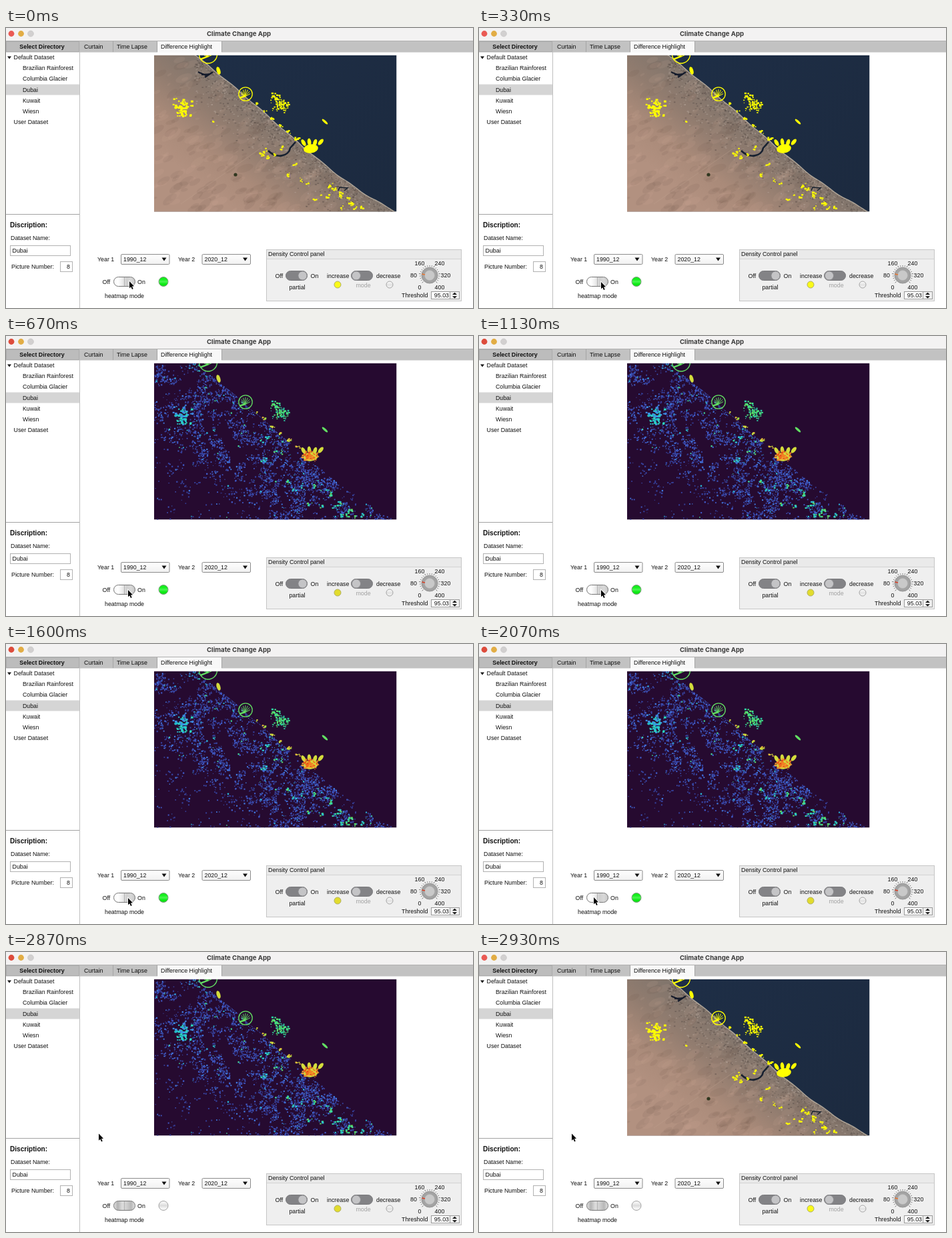
Write an HTML page with a canvas that moves like this. It is 700 by 420 pixels and loops after 2990 ms.

```html
<!DOCTYPE html>
<html lang="en">
<head>
<meta charset="utf-8">
<title>Climate Change App</title>
<style>
html, body { margin: 0; width: 100%; height: 100%; overflow: hidden; background: #fff; }
canvas { display: block; }
</style>
</head>
<body>
<canvas id="stage" width="700" height="420"></canvas>
<script>
const LOOP = 2990, HEAT_START = 400, HEAT_END = 2930, SWITCH_OFF = 2200;
const MAP = { x: 222, y: 41, w: 363.5, h: 234.5 };
const TAU = Math.PI * 2;
const stage = document.getElementById('stage').getContext('2d');

function seeded(seed) {
  return () => {
    seed = (seed + 0x6D2B79F5) | 0;
    let t = Math.imul(seed ^ (seed >>> 15), 1 | seed);
    t = (t + Math.imul(t ^ (t >>> 7), 61 | t)) ^ t;
    return ((t ^ (t >>> 14)) >>> 0) / 4294967296;
  };
}

function layer(paint) {
  const c = document.createElement('canvas');
  c.width = 700;
  c.height = 420;
  paint(c.getContext('2d'));
  return c;
}

function rect(g, x, y, w, h, fill, stroke) {
  if (fill) { g.fillStyle = fill; g.fillRect(x, y, w, h); }
  if (stroke) { g.strokeStyle = stroke; g.lineWidth = 1; g.strokeRect(x + .5, y + .5, w - 1, h - 1); }
}

function line(g, points, color, width = 1) {
  g.beginPath();
  points.forEach(([x, y]) => g.lineTo(x, y));
  g.strokeStyle = color;
  g.lineWidth = width;
  g.stroke();
}

function oval(g, x, y, rx, ry, fill, stroke, width = 1, turn = 0) {
  g.beginPath();
  g.ellipse(x, y, rx, ry, turn, 0, TAU);
  if (fill) { g.fillStyle = fill; g.fill(); }
  if (stroke) { g.strokeStyle = stroke; g.lineWidth = width; g.stroke(); }
}

const disc = (g, x, y, r, fill, stroke, width) => oval(g, x, y, r, r, fill, stroke, width);

// A triangle w wide; positive h points down, negative h points up.
function triangle(g, x, y, w, h) {
  g.beginPath();
  g.moveTo(x - w / 2, y);
  g.lineTo(x + w / 2, y);
  g.lineTo(x, y + h);
  g.fillStyle = '#111';
  g.fill();
}

function text(g, str, x, y, { size = 8.85, bold = false, color = '#111', align = 'left',
  family = '"Liberation Sans", Arial, sans-serif' } = {}) {
  g.font = `${bold ? 'bold ' : ''}${size}px ${family}`;
  g.fillStyle = color;
  g.textAlign = align;
  g.fillText(str, x, y);
}

// Colours spread evenly from one point to the other.
function gradient(g, x0, y0, x1, y1, ...colors) {
  const grad = g.createLinearGradient(x0, y0, x1, y1);
  colors.forEach((color, i) => grad.addColorStop(i / (colors.length - 1), color));
  return grad;
}

// Map

function coastY(x) {
  const u = (x - 284) / 301;
  const bulge = u > 0 && u < 1 ? 13 * Math.sin(Math.PI * u ** 1.8) : 0;
  return 41 + 235 * u + bulge + Math.sin(x / 7) * .8;
}

function coastline(from, to) {
  const points = [];
  for (let x = from; x <= to; x += 3) points.push([x, coastY(x)]);
  return points;
}

function clipMap(g) {
  g.beginPath();
  g.rect(MAP.x, MAP.y, MAP.w, MAP.h);
  g.clip();
}

function scatter(g, rnd, x, y, rx, ry, count, size, colors) {
  const spread = r => (rnd() + rnd() - 1) * r * 1.25;
  for (let i = 0; i < count; i++) {
    const s = size * (.6 + rnd() * .8);
    rect(g, x + spread(rx) - s / 2, y + spread(ry) - s / 2, s, s * .8, colors[Math.floor(rnd() * colors.length)]);
  }
}

function palmIsland(g, x, y, r, color) {
  disc(g, x, y, r, null, color, 1.3);
  for (let i = -3; i <= 3; i++) {
    const a = -Math.PI / 2 + i * .5;
    line(g, [[x - 1, y + 4], [x + Math.cos(a) * r * .7, y + Math.sin(a) * r * .7]], color, 1);
  }
  line(g, [[x - r * .85, y + r * .55], [x, y + 3]], color, 2.4);
}

function harbour(g, colors) {
  oval(g, 457, 181, 11, 6.5, colors[0], null, 1, -.15);
  for (let i = 0; i < 4; i++)
    oval(g, 446 + i * 8.6, 172 - (i % 2), 2.8, 5.5, colors[0], null, 1, -.5 + i * .4);
}

function drawChanges(g, pal) {
  const rnd = seeded(21);
  palmIsland(g, 303, 39.5, 13.5, pal.palm[0]);
  palmIsland(g, 359, 99, 10.2, pal.palm[0]);
  oval(g, 318.5, 64, 2.8, 6, pal.shore[0], null, 1, -.3);
  oval(g, 478, 140.5, 5.5, 1.8, pal.palm[0], null, 1, .75);
  scatter(g, rnd, 405, 104, 9, 5, 20, 2.3, pal.world);
  scatter(g, rnd, 412, 117, 14, 10, 75, 2, pal.world);
  scatter(g, rnd, 265, 120, 13, 12, 68, 2.7, pal.town);
  harbour(g, pal.shore);
  if (pal.core) scatter(g, rnd, 456, 180, 12, 7, 85, 2.2, pal.core);

  for (let i = 0; i < 6; i++) {
    const x = 376 + i * 12;
    scatter(g, rnd, x, coastY(x) - 3, 2 + i * .5, 2, 3 + i, 2.3, pal.shore);
  }
  for (let i = 0; i < 16; i++) {
    const x = 383 + i * 10, depth = 18 + rnd() * 55;
    scatter(g, rnd, x, Math.min(270, coastY(x) + depth), 3, 3, 2 + rnd() * 4, 2.2, pal.inland);
  }
  for (let i = 0; i < 3; i++) scatter(g, rnd, 486 + i * 15.5, 238 + i * 13, 4, 4, 9, 2.4, pal.inland);
  scatter(g, rnd, 386, 186, 6, 5, 10, 2.3, pal.inland);
  scatter(g, rnd, 312, 141, 2, 2, 3, 2, pal.inland);
}

const satellite = layer(g => {
  const rnd = seeded(8), coast = coastline(200, 592);
  clipMap(g);
  rect(g, MAP.x, MAP.y, MAP.w, MAP.h, gradient(g, 300, 41, 585, 275, '#1e2e46', '#1c2a3f'));

  g.save();
  g.beginPath();
  coast.forEach(([x, y]) => g.lineTo(x, y));
  g.lineTo(200, 290);
  g.fillStyle = gradient(g, 440, 170, 352, 282, '#81756c', '#917c6f', '#a98a79', '#b29180');
  g.fill();
  g.clip();
  for (let i = 0; i < 420; i++) {
    const x = MAP.x + rnd() * MAP.w, y = MAP.y + rnd() * MAP.h, r = 2 + rnd() * 11;
    const tone = rnd() < .5 ? 'rgba(216,180,158,.1)' : 'rgba(88,66,56,.09)';
    oval(g, x, y, r, r * .45, tone, null, 1, -.8 + rnd() * .6);
  }
  for (let i = 0; i < 1100; i++) {
    const x = 282 + rnd() * 300, y = coastY(x) + rnd() * rnd() * 90;
    rect(g, x, y, 1 + rnd() * 2, 1 + rnd(), rnd() < .5 ? 'rgba(50,44,44,.3)' : 'rgba(200,186,174,.3)');
  }
  g.restore();

  line(g, coast, 'rgba(196,184,168,.8)', 1.4);
  line(g, [[262, 264], [385, 178]], 'rgba(196,168,148,.4)', .8);
  for (let i = 0; i < 3; i++) line(g, [[288 + i * 5, 66 + i * 4], [302 + i * 4, 72 - i * 3]], '#151b2b', 2.2);
  g.beginPath();
  g.moveTo(393, 184);
  g.bezierCurveTo(406, 197, 424, 192, 426, 180);
  g.lineTo(434, 171);
  g.strokeStyle = '#172130';
  g.lineWidth = 2.6;
  g.stroke();
  line(g, [[498, 244], [500, 239], [512, 240], [507, 244]], '#1b2430', 1.6);
  disc(g, 344, 220, 2.6, '#30371f');
  const yellow = ['#ffff00'];
  drawChanges(g, { palm: yellow, world: yellow, town: yellow, shore: yellow, inland: yellow });
});

const heatmap = layer(g => {
  const rnd = seeded(5), grid = Array.from({ length: 4096 }, seeded(77));
  const cell = (x, y) => grid[(x & 63) + (y & 63) * 64];
  const mix = (a, b, t) => a + (b - a) * t;
  function noise(x, y) {
    const ix = Math.floor(x), iy = Math.floor(y), fx = x - ix, fy = y - iy;
    return mix(mix(cell(ix, iy), cell(ix + 1, iy), fx), mix(cell(ix, iy + 1), cell(ix + 1, iy + 1), fx), fy);
  }
  clipMap(g);
  rect(g, MAP.x, MAP.y, MAP.w, MAP.h, '#260a30');

  for (let i = 0; i < 21000; i++) {
    const x = MAP.x + rnd() * MAP.w, y = MAP.y + rnd() * MAP.h;
    const depth = (y - coastY(x)) * .78;
    const clump = .55 * noise(x / 13, y / 13) + .45 * noise(x / 4.5 + 20, y / 4.5);
    const reach = Math.min(1, Math.max(.14, 1 - (depth - 85) / 45));
    const hub = Math.exp(-((x - 465) ** 2 + (y - 214) ** 2) / 900) * .17;
    const chance = (clump + hub - .41) * 3 * reach;
    const roll = rnd(), tone = rnd(), size = .9 + rnd() * 1.5;
    if (depth < 0 || roll > chance) continue;
    const color = tone < .52 ? '#35409b' : tone < .85 ? '#4059c5' : tone < .97 ? '#4179df' : tone < .99 ? '#29b9d8' : '#43dfa0';
    rect(g, x, y, size, size, color);
  }
  g.setLineDash([3, 2]);
  line(g, coastline(314, 430), '#3e55ba', .9);
  g.setLineDash([]);
  scatter(g, rnd, 282, 46, 12, 7, 26, 1.7, ['#36a3e8', '#30cabd', '#4059c5']);
  drawChanges(g, {
    palm: ['#62df62'],
    world: ['#3fe086', '#5ce86b', '#2fcfa6'],
    town: ['#25bfd5', '#2bd4bd', '#3c8fe8'],
    shore: ['#d3dc3c', '#a5e343', '#eabd39'],
    inland: ['#31d9aa', '#2bc4d7', '#62e35d'],
    core: ['#e94d18', '#f17a22', '#f5a030']
  });
});

// Window

function field(g, x, y, w, h, label) {
  rect(g, x, y, w, h, '#fff', '#b2b2b2');
  text(g, label, x + 3.5, y + h / 2 + 3.2);
}

function rounded(g, x, y, w, h, r, fill, stroke) {
  g.beginPath();
  g.roundRect(x, y, w, h, r);
  g.fillStyle = fill;
  g.fill();
  g.strokeStyle = stroke;
  g.lineWidth = 1;
  g.stroke();
}

function dropdown(g, x, label) {
  rounded(g, x + .5, 339.5, 72.5, 15, 1.5, gradient(g, 0, 339, 0, 355, '#fff', '#f0f0f0'), '#8c8c8c');
  text(g, label, x + 4, 350);
  triangle(g, x + 65, 344.5, 7, 5);
}

function dimSwitch(g, x, knobX) {
  rounded(g, x, 364.5, 32, 14, 7, '#838386', '#77777a');
  disc(g, knobX, 371.5, 6.6, '#c4c4c6', '#8a8a8d');
}

function drawDial(g) {
  for (let i = 0; i <= 20; i++) {
    const a = Math.PI * (.75 + 1.5 * i / 20), dx = Math.cos(a), dy = Math.sin(a), r = i % 4 ? 15 : 16;
    line(g, [[635 + dx * 13.4, 371 + dy * 13.4], [635 + dx * r, 371 + dy * r]], '#666', .9);
  }
  disc(g, 635, 371, 12, '#a3a3a3', '#949494');
  disc(g, 635, 371, 7.5, '#c9c9c9', '#b5b5b5', .6);
  for (let i = 0; i < 3; i++) {
    const dx = 15 + 9 * Math.sin(Math.PI * i / 2), y = 391.5 - 17.75 * i;
    text(g, 80 * i, 635 - dx, y, { align: 'center' });
    text(g, 400 - 80 * i, 635 + dx, y, { align: 'center' });
  }
}

const chrome = layer(g => {
  rect(g, 0, 0, 700, 420, '#fff');
  rect(g, 0, 0, 700, 19, '#f3f2f2');
  rect(g, 0, 19, 700, 17.5, '#c2c2c2');
  line(g, [[0, 19.5], [700, 19.5]], '#b0b0b0');
  disc(g, 22.5, 8.5, 4.4, '#e2ad45');
  disc(g, 37, 8.5, 4.4, '#d2d0d0', '#c2c0c0', .6);
  text(g, 'Climate Change App', 349, 12, { size: 9.6, bold: true, align: 'center', color: '#3a3a3a', family: 'Inter, sans-serif' });

  rect(g, 0, 20, 110, 16, '#bcbcbc', '#acacac');
  text(g, 'Select Directory', 54, 31.3, { bold: true, align: 'center' });
  rect(g, 227, 20, 96, 17, '#f8f8f8');
  [160.5, 226.5, 323.5].forEach(x => line(g, [[x, 20], [x, 36]], '#a4a4a4'));
  text(g, 'Curtain', 117, 31);
  text(g, 'Time Lapse', 166, 31);
  text(g, 'Difference Highlight', 232, 31);

  rect(g, 0, 84.5, 110, 16, '#d5d5d5');
  triangle(g, 5, 42.5, 6, 4);
  text(g, 'Default Dataset', 11.5, 47.3);
  ['Brazilian Rainforest', 'Columbia Glacier', 'Dubai', 'Kuwait', 'Wiesn']
    .forEach((s, i) => text(g, s, 25, 63.4 + i * 16.05, { size: 8.75 }));
  text(g, 'User Dataset', 11.5, 143.5);
  line(g, [[110.5, 20], [110.5, 420]], '#c0c0c0');
  line(g, [[0, 279.5], [110, 279.5]], '#a2a2a2');

  text(g, 'Discription:', 6, 298.5, { size: 10.1, bold: true });
  text(g, 'Dataset Name:', 7, 318);
  field(g, 6, 326, 91, 16, 'Dubai');
  text(g, 'Picture Number:', 8, 361);
  field(g, 81, 350, 19, 16, '');
  text(g, '8', 96, 361.2, { align: 'right' });

  text(g, 'Year 1', 137, 350);
  dropdown(g, 172, '1990_12');
  text(g, 'Year 2', 258, 350);
  dropdown(g, 293.5, '2020_12');
  text(g, 'Off', 144.5, 384);
  text(g, 'On', 197, 384);
  text(g, 'heatmap mode', 177.5, 405, { align: 'center' });

  rect(g, 390, 332, 293, 78, '#efefef', '#c6c6c6');
  rect(g, 391, 333, 291, 13, '#eaeaea');
  line(g, [[391, 346.5], [682, 346.5]], '#d3d3d3');
  text(g, 'Density Control panel', 393, 342.3);
  text(g, 'Off', 403.5, 375);
  dimSwitch(g, 419.5, 444.5);
  text(g, 'On', 456.5, 375);
  text(g, 'partial', 436.5, 391.5, { align: 'center' });
  text(g, 'increase', 481, 375);
  dimSwitch(g, 517.5, 525);
  text(g, 'decrease', 555, 375);
  text(g, 'mode', 535.5, 388.5, { align: 'center', color: '#a0a0a0' });
  disc(g, 575, 385, 5, gradient(g, 0, 380, 0, 390, '#fff', '#e2e2e2', '#f5f5f5'), '#a5a5a5');
  drawDial(g);
  text(g, 'Threshold', 593, 404);
  rect(g, 637, 395, 43, 12, '#fff', '#999');
  text(g, '95.03', 664, 404.3, { align: 'right' });
  rect(g, 665, 395, 15, 12, '#f1f1f1', '#999');
  triangle(g, 672.5, 400, 7, -3.3);
  triangle(g, 672.5, 402.3, 7, 3.3);
});

function drawHeatSwitch(on) {
  const shades = on
    ? ['#f4f4f4', '#fff', '#ececec', '#cfcfcf', '#d8d8d8', '#c5c5c5']
    : ['#e6e6e6', '#b4b4b4', '#dcdcdc', '#d0d0d0', '#b8b8b8', '#e6e6e6'];
  rounded(stage, 161.5, 373.5, 32, 14, 7, gradient(stage, 161, 0, 194, 0, ...shades), '#777');
  line(stage, [[177.5, 374], [177.5, 387]], '#aaa', .8);
  const lamp = on ? ['#28e02e', '#10f018', '#48f54e', '#08ea10', '#22dc28'] : ['#fff', '#f0f0f0', '#dcdcdc', '#f4f4f4', '#fafafa'];
  disc(stage, 236, 380.5, 7, gradient(stage, 0, 373, 0, 388, ...lamp), on ? '#789b79' : '#a2a2a2');
}

function ease(t, from, to) {
  const u = Math.min(1, Math.max(0, (t - from) / (to - from)));
  return u * u * (3 - 2 * u);
}

function drawCursor(t) {
  const settle = ease(t, 70, 270), press = ease(t, 1900, 2060), leave = ease(t, 2400, 2780);
  stage.save();
  stage.translate(185 - 2 * settle - 11 * press - 33 * leave, 380 + settle - press - 107.5 * leave);
  const arrow = new Path2D('M0 0V10.2L2.3 8.2L4 12L5.7 11.2L4 7.5L7 7.2Z');
  stage.strokeStyle = '#fff';
  stage.lineWidth = 1.6;
  stage.stroke(arrow);
  stage.fillStyle = '#000';
  stage.fill(arrow);
  stage.restore();
}

function render(now) {
  const t = now % LOOP, heat = t >= HEAT_START && t < HEAT_END;
  stage.drawImage(chrome, 0, 0);
  stage.drawImage(heat ? heatmap : satellite, 0, 0);
  disc(stage, 8, 8.5, 4.4, heat ? '#dd4c3c' : '#ea5a54');
  disc(stage, 497, 385, 5, heat ? '#e2dc2d' : '#fafa18', '#b0b060');
  line(stage, [[623.5, 369], [628, 370]], heat ? '#dc3c22' : '#ec742c', 1.5);
  drawHeatSwitch(t < SWITCH_OFF);
  drawCursor(t);
}

const start = performance.now();
function tick() {
  render(performance.now() - start);
  requestAnimationFrame(tick);
}
tick();
</script>
</body>
</html>
```
